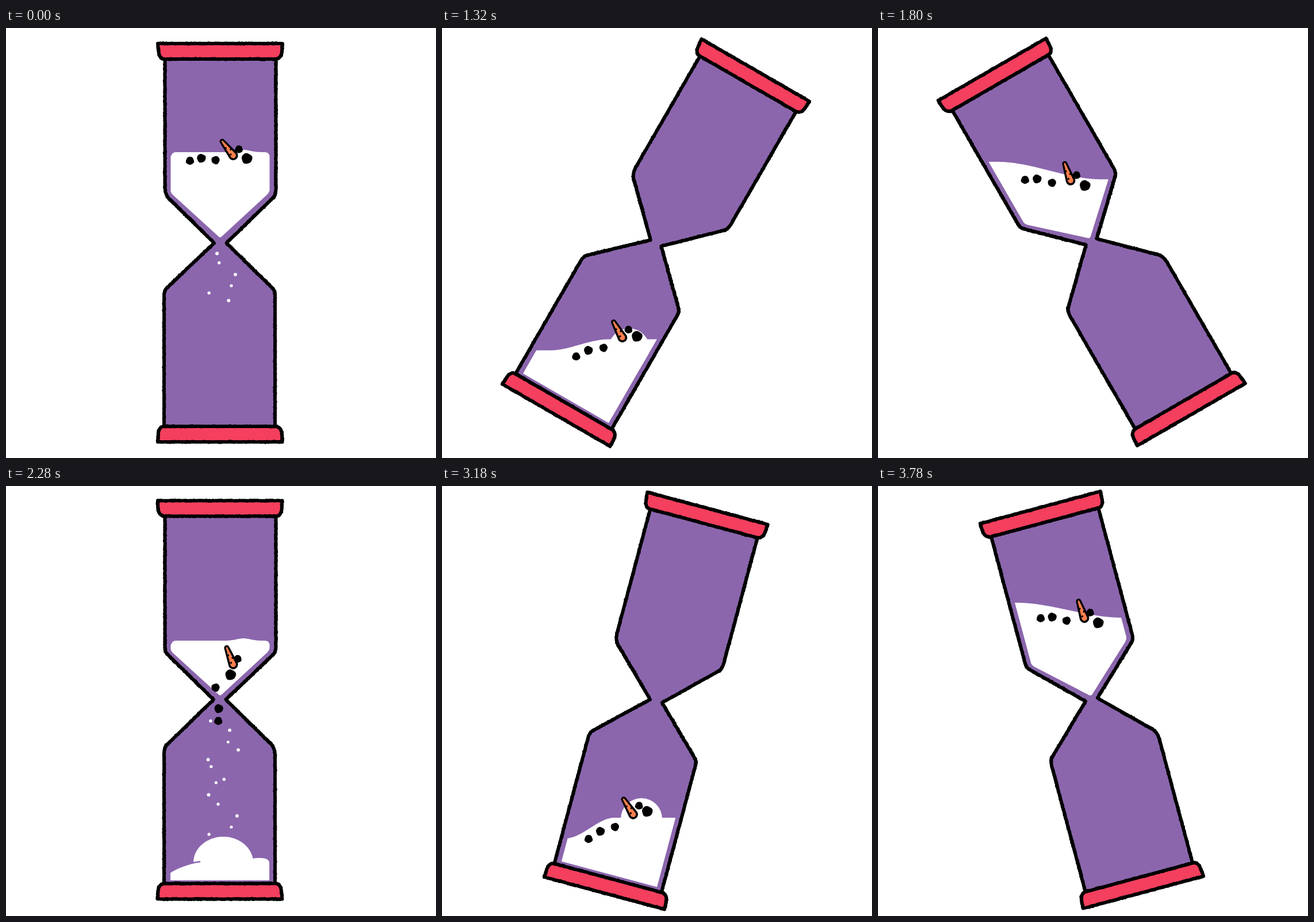
Recreate the animation shown at these times as an HTML page with a canvas. Size 748 px wide and 748 px high, loop 3.84 s.

```html
<!DOCTYPE html>
<html lang="en">
<head>
<meta charset="utf-8">
<title>Snowman hourglass</title>
<style>
  html, body { margin: 0; width: 100%; height: 100%; overflow: hidden; background: #fff; }
  canvas { display: block; width: 100vw; height: 100vh; }
</style>
</head>
<body>
<canvas id="stage" width="748" height="748"></canvas>
<script>
const ctx = document.getElementById('stage').getContext('2d');
const STEP = 60, CYCLE = 32, LANDED = 13, TURN = 20;
const PIVOT = [372.25, 372.75], NECK = [371, 372];
const PURPLE = '#8b66ad', RED = '#f43f5e', ORANGE = '#ff7f4d';

let seed = 7;
function rand() {
  seed = (seed * 16807) % 2147483647;
  return seed / 2147483647;
}
const clamp = v => Math.max(0, Math.min(1, v));
const mix = (a, b, p) => a + (b - a) * p;
const smooth = p => p * p * (3 - 2 * p);

// An ink line with a grainy edge
function inkLine(d) {
  const el = document.createElementNS('http://www.w3.org/2000/svg', 'path');
  el.setAttribute('d', d);
  const grain = new Path2D(), len = el.getTotalLength();
  for (let s = 0; s < len; s += 2.4) {
    const p = el.getPointAtLength(s), r = 2.6 + rand() * 0.7;
    const x = p.x + rand() - 0.5, y = p.y + rand() - 0.5;
    grain.moveTo(x + r, y);
    grain.arc(x, y, r, 0, 7);
  }
  return { line: new Path2D(d), grain };
}

const LEFT = 'M276.5 54 V279 Q277 292 287 300 L362 374 L281 451 Q275 456 275 466 V693';
const RIGHT = '468 693 V465 Q468 457 463 452 L383.5 374 L463 297 Q469 291 469.5 283 V54';
const CAPS = [
  'M264 27 H481 L480 42 Q478 53 469 54 H275 Q267 53 265.5 42 Z',
  'M274 693 H469 Q478 694 480 705 L480.5 720 H264 L265 705 Q266 694 274 693 Z'
];
const glassFill = new Path2D(LEFT + ' L' + RIGHT + ' Z');
const walls = [LEFT, 'M' + RIGHT].map(inkLine);
const caps = CAPS.map(inkLine);
const chamber = new Path2D('M286 686 V463 Q287 459 291 455 L369 383 Q372 380 375 383 L454 455 Q458 459 458 463 V686 Z');

function rotate(deg) {
  ctx.translate(...PIVOT);
  ctx.rotate(deg * Math.PI / 180);
  ctx.translate(-PIVOT[0], -PIVOT[1]);
}

function ink(shape) {
  ctx.strokeStyle = ctx.fillStyle = '#000';
  ctx.lineWidth = 5.6;
  ctx.lineJoin = 'round';
  ctx.stroke(shape.line);
  ctx.fill(shape.grain);
}

function drawGlass(deg) {
  ctx.save();
  rotate(deg);
  ctx.fillStyle = PURPLE;
  ctx.fill(glassFill);
  walls.forEach(ink);
  caps.forEach(cap => {
    ctx.fillStyle = RED;
    ctx.fill(cap.line);
    ink(cap);
  });
  ctx.restore();
}

// Clips to the snow chamber turned by deg, then draws unrotated
function inChamber(deg, draw) {
  ctx.save();
  rotate(deg);
  ctx.clip(chamber);
  rotate(-deg);
  ctx.fillStyle = '#fff';
  draw();
  ctx.restore();
}

function ellipse(x, y, rx, ry = rx) {
  ctx.beginPath();
  ctx.ellipse(x, y, rx, ry, 0, 0, 7);
  ctx.fill();
}

function fillBelow(surface) {
  ctx.beginPath();
  ctx.moveTo(0, 748);
  for (let x = 0; x <= 748; x += 2) ctx.lineTo(x, surface(x));
  ctx.lineTo(748, 748);
  ctx.fill();
}

// Snow slope (heights and x of both ends) and the row of parts riding on it
const POSES = [
  { k: 21, left: 613, right: 577, x0: 215, x1: 300, rowX: 255, rowY: 614, span: 102, drop: -51 },
  { k: 26, left: 352, right: 400, x0: 80, x1: 245, rowX: 147, rowY: 401, span: 121, drop: 14 },
  { k: 31, left: 203, right: 229, x0: 240, x1: 424, rowX: 283, rowY: 230, span: 100, drop: 5 },
  { k: 32, left: 216, right: 216, x0: 287, x1: 459, rowX: 320, rowY: 231, span: 99, drop: -7 }
];
const PILE = POSES[3];

function poseAt(k) {
  const i = POSES.findIndex(p => p.k >= k);
  const b = POSES[i], a = POSES[Math.max(0, i - 1)];
  const p = a === b ? 0 : (k - a.k) / (b.k - a.k), pose = {};
  for (const key in a) pose[key] = mix(a[key], b[key], p);
  return pose;
}

// along, lift: place in the row; rest: place on the snowman; neck: step of passing it
const PARTS = [
  { along: 0, lift: 0, rest: [359, 623], neck: 4.8, r: 7 },
  { along: 0.2, lift: 3, rest: [357, 601], neck: 5.5, r: 7.6 },
  { along: 0.45, lift: -2, rest: [364, 581], neck: 6.8, r: 7.1 },
  { along: 0.86, lift: 14, rest: [360, 524], neck: 9.4, r: 6.7 },
  { along: 1, lift: -3, rest: [385, 525], neck: 7.9, r: 9.2 }
];
const CARROT = { along: 0.76, lift: 4, rest: [365, 544], neck: 9 };

const inRow = (part, pose) => [
  pose.rowX + pose.span * part.along,
  pose.rowY + pose.drop * part.along - part.lift
];

// Sinks with the snow, slides along the funnel, then drops to its rest
function pouring(part, k) {
  const [x, y] = inRow(part, PILE);
  if (k > part.neck) {
    const q = clamp((k - part.neck) / (LANDED - part.neck));
    return part.rest.map((v, i) => mix(NECK[i], v, q));
  }
  const sunk = mix(y, NECK[1], (k / part.neck) ** 1.3);
  const room = 0.45 * (NECK[1] - sunk);
  return [NECK[0] + Math.max(-room, Math.min(room, x - NECK[0])), sunk];
}

function carrotAngle(k) {
  if (k > TURN) return mix(-122, -109, clamp((k - TURN - 1) / 5));
  if (k < CARROT.neck) return mix(-128, -103, k / CARROT.neck);
  return mix(-103, -173, clamp((k - CARROT.neck) / (LANDED - CARROT.neck)));
}

function drawUpperSnow(k) {
  if (k >= 12) return;
  const level = mix(PILE.left, 366, (k / 12) ** 1.5);
  inChamber(180, () => fillBelow(x =>
    level - 4 * Math.exp(-(((x - 413) / 16) ** 2))
    + 8 * Math.exp(-Math.max(0, x - 287) / 2) + 8 * Math.exp(-Math.max(0, 459 - x) / 2)));
}

function drawSnowman(k) {
  const grow = clamp((k - 1) / 5), p = clamp((k - 6) / 5);
  if (!grow) return;
  const y = 654 - 11.5 * p;
  inChamber(0, () => {
    ctx.translate(0, 686 * (1 - grow));
    ctx.scale(1, grow);
    ctx.beginPath();
    ctx.moveTo(286, 690);
    ctx.lineTo(286, y + 19);
    ctx.quadraticCurveTo(304, y + 7, 338, y);
    ctx.lineTo(428, y - 6);
    ctx.quadraticCurveTo(458, y - 10, 458, y + 2);
    ctx.lineTo(458, 690);
    ctx.fill();
    ellipse(mix(378, 373, p), mix(655, 625, p), mix(52, 58, p), mix(45, 62, p));
    ellipse(380, mix(650, 543.5, clamp((k - 6) / 7)), 36.5);
    ctx.strokeStyle = PURPLE;
    ctx.lineWidth = 2.6;
    ctx.lineCap = 'round';
    ctx.beginPath();
    ctx.moveTo(319, y + 2.5);
    ctx.lineTo(337, y - 0.5);
    ctx.stroke();
  });
}

function drawSlide(k, deg, pose) {
  inChamber(deg, () => {
    fillBelow(x => mix(pose.left, pose.right, smooth(clamp((x - pose.x0) / (pose.x1 - pose.x0)))));
    ellipse(pose.rowX + 92, pose.right + 2 + 15 * (k - TURN - 1), 36);
  });
}

const grains = Array.from({ length: 18 }, (_, i) => ({
  phase: (i + rand()) / 18, side: rand() * 2 - 1, r: 2.4 + rand() * 0.6
}));

function drawGrains(k) {
  if (k >= 12) return;
  ctx.fillStyle = '#fff';
  grains.forEach(g => {
    const y = 386 + 290 * ((g.phase + k / 12) % 1);
    if (y < 475 + 60 * k) ellipse(373 + 36 * g.side * clamp((y - 375) / 60), y, g.r);
  });
}

function blob(x, y, r, phase) {
  ctx.beginPath();
  for (let a = 0; a < 6.28; a += 0.3) {
    const w = r * (1 + 0.04 * Math.sin(3 * a + phase) + 0.03 * Math.sin(5 * a + 2 * phase));
    ctx.lineTo(x + w * Math.cos(a), y + w * Math.sin(a));
  }
  ctx.fill();
}

function drawCarrot(x, y, deg) {
  const taper = (tip, base) => {
    ctx.beginPath();
    ctx.arc(0, 0, base, Math.PI / 2, -Math.PI / 2);
    ctx.arc(31, 0, tip, -Math.PI / 2, Math.PI / 2);
    ctx.fill();
  };
  ctx.save();
  ctx.translate(x, y);
  ctx.rotate(deg * Math.PI / 180);
  ctx.fillStyle = '#000';
  taper(4.6, 8.4);
  ctx.fillStyle = ORANGE;
  taper(1.3, 4.7);
  ctx.fillStyle = '#000';
  for (let i = 0; i < 3; i++) ellipse(4 + 7 * i, i % 2 ? 3 : -2.4, 1.7);
  ctx.restore();
}

function drawParts(place, k) {
  ctx.fillStyle = '#000';
  PARTS.forEach((part, i) => blob(...place(part), part.r, 2 * i));
  drawCarrot(...place(CARROT), carrotAngle(k));
}

function draw(ms) {
  const frame = Math.floor(ms / STEP) % (CYCLE * 2);
  const k = frame % CYCLE;
  ctx.fillStyle = '#fff';
  ctx.fillRect(0, 0, 748, 748);
  if (k > TURN) {
    const deg = (k - TURN) * 15, pose = poseAt(k);
    drawGlass(deg);
    drawSlide(k, deg, pose);
    drawParts(part => inRow(part, pose), k);
  } else {
    drawGlass(frame < CYCLE ? 0 : 180);
    drawUpperSnow(k);
    drawGrains(k);
    drawSnowman(k);
    drawParts(part => pouring(part, k), k);
  }
}

const start = performance.now();
function tick() {
  draw(performance.now() - start);
  requestAnimationFrame(tick);
}
tick();
</script>
</body>
</html>
```
